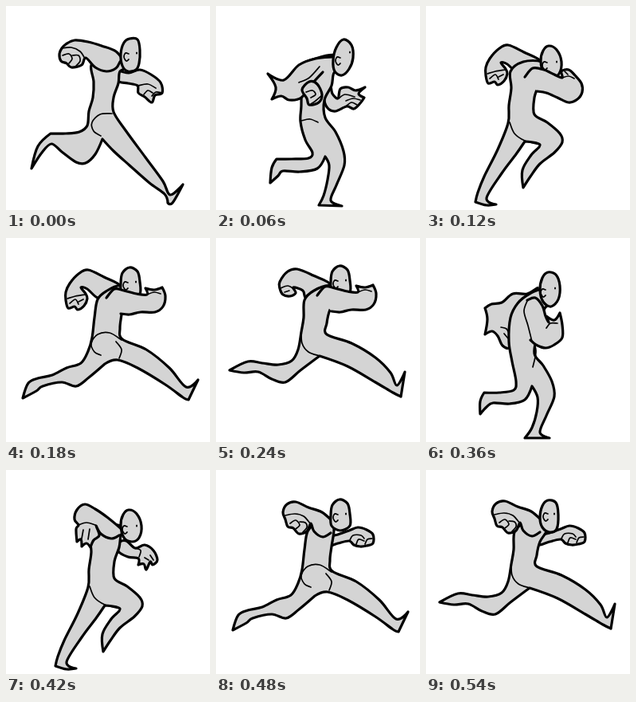
An HTML page that plays this animation: 256x256 px, repeating every 600 ms.

```html
<!DOCTYPE html>
<html lang="en">
<head>
<meta charset="utf-8">
<title>Run cycle</title>
<style>
html, body { margin: 0; width: 100%; height: 100%; overflow: hidden; background: #fff; }
svg { display: block; width: 100vw; height: 100vh; }
path { fill: #d4d4d4; stroke: #000; stroke-width: 3.2; stroke-linejoin: round; stroke-linecap: round; }
.line { fill: none; stroke-width: 1.7; }
.dot { fill: #000; stroke: none; }
</style>
</head>
<body>
<svg id="stage" viewBox="0 0 256 256"></svg>
<script>
const STEP = 60;
const stage = document.getElementById('stage');

// Smooth curve through points; "!" marks a corner, a final "z" closes it.
function curve(text) {
  const closed = text.endsWith('z');
  const pts = text.replace('z', '').trim().split(/\s+/).map(s => {
    const [x, y] = s.replace('!', '').split(',').map(Number);
    return { x, y, corner: s.endsWith('!') };
  });
  const n = pts.length;
  const at = i => closed ? pts[(i + n) % n] : pts[Math.max(0, Math.min(n - 1, i))];
  const slope = i => {
    if (at(i).corner) return [0, 0];
    const a = at(i - 1), b = at(i + 1);
    return [(b.x - a.x) / 6, (b.y - a.y) / 6];
  };
  let d = `M${pts[0].x} ${pts[0].y}`;
  for (let i = 0; i < (closed ? n : n - 1); i++) {
    const a = at(i), b = at(i + 1), s = slope(i), e = slope(i + 1);
    d += `C${a.x + s[0]} ${a.y + s[1]} ${b.x - e[0]} ${b.y - e[1]} ${b.x} ${b.y}`;
  }
  return d + (closed ? 'Z' : '');
}

const move = (dx, dy, svg) => `<g transform="translate(${dx} ${dy})">${svg}</g>`;
const shape = text => `<path d="${curve(text)}"/>`;
const lines = (...list) => list.map(t => `<path class="line" d="${curve(t)}"/>`).join('');

function head(outline, ear, eye) {
  const [x, y] = ear, [u, v] = eye;
  return shape(outline) +
    lines(`${x + 3},${y - 4} ${x - 1},${y - 5} ${x - 3},${y} ${x},${y + 5} ${x + 3},${y + 3}`) +
    `<path class="dot" d="M${u - 1} ${v}a1 1.5 0 1 0 2 0a1 1.5 0 1 0-2 0"/>`;
}

const heads = {
  contact: head('148,46 155,41 165,42 168,55 167,72 163,80 153,82 146,75 144,60 z', [151, 64], [164, 59]),
  dip: head('151,52 160,42 170,49 172,65 167,79 158,87 149,82 147,68 z', [153, 69], [168, 58]),
  leap: head('146,44 155,37 165,42 168,55 168,70 156,76 145,70 144,57 z', [150, 60], [163, 55]),
  reach: head('146,47 155,40 164,41 167,54 167,69 156,75 146,69 143,57 z', [149, 58], [162, 58]),
  sink: head('146,50 153,43 163,46 168,60 166,77 157,86 147,80 143,65 z', [147, 69], [162, 63]),
  push: head('147,56 154,50 164,55 170,70 167,85 158,90 148,85 144,69 z', [149, 75], [164, 70]),
  float: head('146,45 153,38 163,41 166,56 164,74 155,78 146,72 143,60 z', [150, 59], [161, 55])
};

const bodies = {
  contact: shape(`143,62 122,64 107,74 110,95 109,115 104,132 102,150 92,158 75,160 56,160!
    40,176 32,204! 45,184 57,173 70,183 88,196 100,197 112,186 121,167! 135,182 155,200 180,222
    199,236 203,247! 209,247 222,224! 206,237 197,220 175,190 150,156 135,133 135,115 141,97 143,82 154,76 z`) +
    lines('133,135 118,136 108,146 110,157 119,163'),
  dip: shape(`150,62 125,66 106,76 107,100 107,125 106,145 112,168 121,184 116,191 95,192 76,192!
    70,203 68,222! 78,213 84,207 105,208 127,204 137,189! 142,200 140,218 135,238 129,250!
    158,251! 144,244 151,225 161,200 160,182 150,158 137,140 136,118 145,100 148,84 158,80 z`) +
    lines('107,144 118,142 128,146'),
  leap: shape(`143,60 127,66 115,77 111,100 108,125 103,142 94,157 76,163 58,172 40,176 28,182
    21,201! 38,192 46,186 70,181 88,186 104,175 124,158! 140,153 165,163 200,184 222,200
    229,203! 241,178! 226,187 205,163 176,140 146,127 143,113 145,96 148,74 z`) +
    lines('145,128 130,119 115,121 107,132 111,143 119,147', '138,130 145,140 142,151'),
  reach: shape(`143,60 122,66 108,78 110,103 106,130 102,147 94,159 76,165 57,164! 35,179!
    47,178 60,174 75,190 94,198 109,190 126,168! 140,184 163,209 190,236 203,246 209,248!
    222,224! 205,236 185,210 156,175 134,140 134,118 140,97 145,72 z`) +
    lines('130,149 115,151 104,158'),
  sink: shape(`146,65 130,70 115,82 106,100 104,130 108,155 113,180 110,191 92,194 73,194!
    68,205 68,221! 76,212 84,207 105,208 124,203 133,186! 140,200 139,218 133,238 124,251!
    155,251! 143,244 151,223 161,199 158,180 147,160 136,145 140,120 148,90 157,80 z`) +
    lines('135,128 138,143 134,162'),
  push: shape(`145,70 122,70 106,82 107,103 104,125 103,147 90,180 73,214 65,234 62,246!
    76,250 88,249! 76,241 95,210 113,186 124,170! 143,174 132,187 121,206 122,228! 131,214
    143,198 161,184 171,171 168,160 152,146 136,136 136,115 142,97 145,80 154,82 z`) +
    lines('105,146 111,160 124,169 143,174'),
  float: shape(`143,60 123,66 111,78 110,100 107,118 103,140 95,154 78,159 58,157 40,155 17,166!
    35,169 53,168 70,177 87,181 106,166 130,148! 165,161 200,181 222,194 232,199! 237,168!
    227,185 219,169 200,150 170,132 139,121 139,107 143,90 152,74 z`) +
    lines('107,115 108,132 116,143 130,148')
};

const nearBack = {
  contact: shape(`150,72 138,57 120,50 103,45 86,43 75,48 70,53 67,60 69,69 76,72 82,77 95,74 100,65
    112,77 126,82 138,78 143,70`) +
    lines('70,53 82,52 93,57 99,66', '71,62 79,60 83,66 79,72', '83,62 91,62 93,69 88,75'),
  dip: shape(`146,64 125,66 104,74 85,93 65,85! 75,102 70,117! 82,113 92,118 107,115 122,96 134,83`) +
    shape('108,105 117,95 127,98 133,111 129,121 117,124 114,116 z') +
    lines('104,96 117,90 130,76', '113,108 121,106 125,111 119,115', '119,123 125,119 132,113'),
  push: shape(`146,75 128,60 112,49 99,43 89,50 86,62 91,69 88,74 89,90! 94,87 95,96! 101,92
    106,97! 110,88 117,82 113,70 119,80 132,86 142,82`) +
    lines('91,69 101,66 112,69', '97,75 95,86', '105,74 103,87'),
  float: shape(`146,64 132,52 115,46 99,39 88,42 83,52 86,61 89,70 96,72 103,79 113,76 118,66
    122,76 133,83 143,78`) +
    lines('86,56 98,54 109,57 117,66', '92,66 99,62 104,68 99,73', '104,64 111,65 113,71 108,77')
};

const farFront = {
  contact: shape(`141,82 154,84 168,80 182,86 194,96 196,109 187,112 183,121 174,114 166,109
    165,100 153,97 140,94 z`) +
    lines('166,100 178,98 188,103', '173,111 178,106 184,109', '183,113 188,108 195,109'),
  dip: shape(`143,99 146,110 153,116 156,104 166,102 175,106 187,102! 179,110 186,115! 181,122
    173,129 164,126 150,132 140,128 136,115 z`) +
    lines('154,116 162,111 174,114', '163,119 172,116 181,118', '164,125 170,121 177,124'),
  push: shape(`142,91 151,89 162,98 174,94 185,101 190,113 184,119 181,115 176,125 173,118
    166,119! 166,111 153,109 141,102 z`) +
    lines('162,98 169,101 167,109', '174,110 179,113', '181,107 185,113'),
  float: shape(`142,83 155,79 169,74 180,70 191,73 199,79 199,90 191,93 183,94 175,92 169,87
    155,90 141,94 z`) +
    lines('170,86 174,80 184,80 188,84', '178,91 181,85 188,87', '189,91 192,85 198,84')
};

const nearFront = {
  leap: shape('126,75 136,64 148,66 164,70 177,71 175,63! 186,65 196,62! 200,73 197,86 187,93 169,93 155,96 144,95') +
    lines('177,71 186,68 194,70'),
  reach: shape('124,78 134,67 148,69 161,75 171,79 170,71 179,69 187,76 195,86 196,97 190,106 179,110 165,104 151,98 139,96') +
    lines('171,79 179,77 186,80', '174,71 178,75'),
  sink: shape('127,78 137,75 146,85 150,98 154,106 151,98! 161,103 168,94! 171,109 171,125 161,134 150,138 138,134 131,128') +
    lines('127,79 123,92 128,110 133,130', '151,113 156,107 165,107')
};

const farBack = {
  leap: shape(`143,60 123,49 103,40 91,45 80,57 75,68 75,78 78,88 86,86 90,90 98,85 102,76
    100,70 94,62 102,64 115,75 128,72 z`) +
    lines('77,76 87,73 99,71', '80,82 87,77 91,83', '91,80 97,77'),
  reach: shape('143,60 122,49 102,41 90,44 80,57 80,65 84,73 93,75 100,71 97,64 109,68 113,77 128,72 z') +
    lines('81,65 90,62 98,66', '86,70 92,68'),
  sink: shape('140,63 127,70 109,70 95,81 82,83 74,88! 77,102 74,121! 83,117 90,123 96,135 105,137 107,115 116,84 z') +
    lines('94,112 101,114 105,122', '98,120 103,126')
};

// Layer order depends on which arm swings forward.
const armBack = (far, body, near, face) => far + body + near + face;
const armFront = (far, body, face, near) => far + body + face + near;

const poses = [
  armBack(farFront.contact, bodies.contact, nearBack.contact, heads.contact),
  armBack(farFront.dip, bodies.dip, nearBack.dip, heads.dip),
  armFront(move(0, 9, farBack.leap), bodies.push, heads.push, move(0, 11, nearFront.reach)),
  armFront(farBack.leap, bodies.leap, heads.leap, nearFront.leap),
  armFront(move(0, -2, farBack.reach), bodies.float, move(0, -2, heads.leap), move(1, -3, nearFront.leap)),
  armFront(farBack.reach, bodies.reach, heads.reach, nearFront.reach),
  armFront(farBack.sink, bodies.sink, heads.sink, nearFront.sink),
  armBack(farFront.push, bodies.push, nearBack.push, heads.push),
  armBack(move(-2, 2, farFront.float), bodies.leap, move(1, 1, nearBack.float), heads.leap),
  armBack(farFront.float, bodies.float, nearBack.float, heads.float)
];

stage.innerHTML = poses.map(p => `<g visibility="hidden">${p}</g>`).join('');
const groups = [...stage.children];
let shown = -1;

function draw(time) {
  const i = Math.floor(time / STEP) % poses.length;
  if (i !== shown) {
    if (shown >= 0) groups[shown].setAttribute('visibility', 'hidden');
    groups[i].setAttribute('visibility', 'visible');
    shown = i;
  }
}

const start = performance.now();
function tick() {
  draw(performance.now() - start);
  requestAnimationFrame(tick);
}
tick();
</script>
</body>
</html>
```
